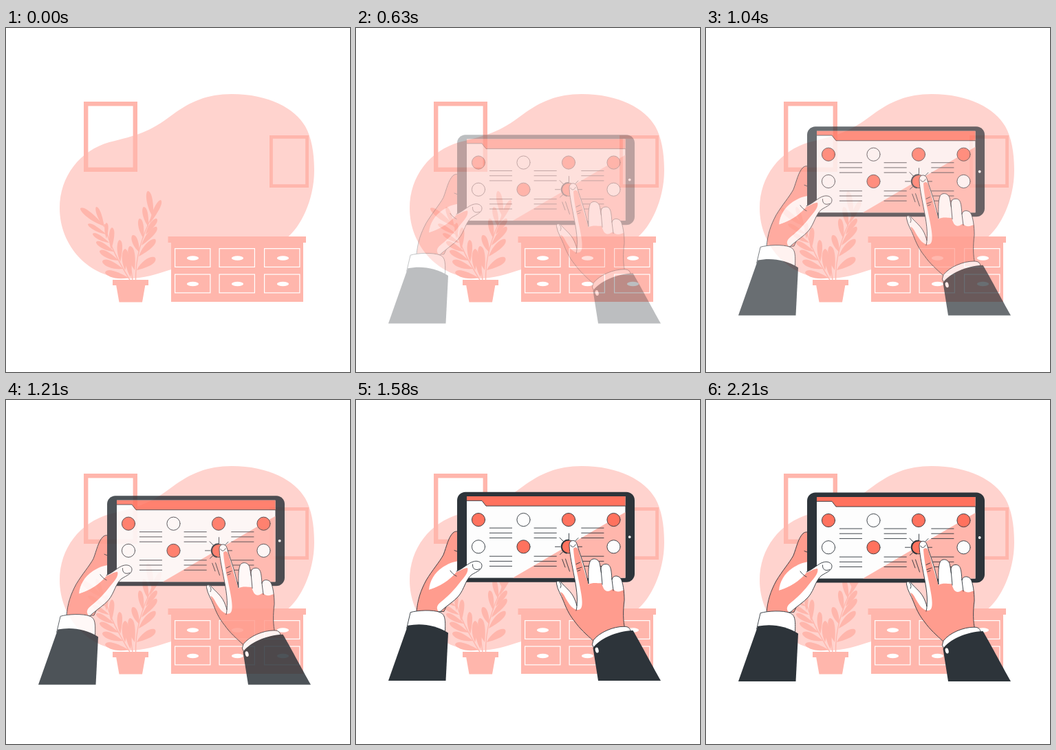
Write an HTML page with a canvas that moves like this. It is 500x500 px and loops after 2.25 s.

```html
<!DOCTYPE html>
<html lang="en">
<head>
<meta charset="utf-8">
<title>Tablet in hands</title>
<style>
html, body { margin: 0; width: 100%; height: 100%; overflow: hidden; background: #fff; }
canvas { display: block; width: 100vw; height: 100vh; }
</style>
</head>
<body>
<canvas id="stage" width="500" height="500"></canvas>
<script>
const SIZE = 500, LOOP = 2250, FPS = 24, FRAMES = 54;
const DARK = '#2d343a', CORAL = '#ff725e', SKIN = '#ff9c8e',
      ROSE = '#ffb6ac', BLUSH = '#ffd3ce', WHITE = '#fff', PAPER = '#fdfdfd';

const view = document.getElementById('stage').getContext('2d');

function layer() {
  const c = document.createElement('canvas');
  c.width = c.height = SIZE;
  return c.getContext('2d');
}

function shape(g, d, fill, stroke, width = 0.9) {
  const p = new Path2D(d);
  if (fill) { g.fillStyle = fill; g.fill(p); }
  if (stroke) { g.strokeStyle = stroke; g.lineWidth = width; g.stroke(p); }
}

function box(g, x1, y1, x2, y2, fill) {
  g.fillStyle = fill;
  g.fillRect(x1, y1, x2 - x1, y2 - y1);
}

function frame(g, x1, y1, x2, y2, width, color) {
  g.strokeStyle = color;
  g.lineWidth = width;
  g.strokeRect(x1 + width / 2, y1 + width / 2, x2 - x1 - width, y2 - y1 - width);
}

function oval(g, x, y, rx, ry, fill, stroke, turn = 0) {
  g.beginPath();
  g.ellipse(x, y, rx, ry, turn, 0, Math.PI * 2);
  g.fillStyle = fill;
  g.fill();
  if (stroke) { g.strokeStyle = stroke; g.lineWidth = 0.9; g.stroke(); }
}

// Leaf from base to tip, widest near the tip.
function leaf(g, bx, by, tx, ty, w) {
  const dx = tx - bx, dy = ty - by, len = Math.hypot(dx, dy);
  const nx = -dy / len * w, ny = dx / len * w;
  const at = (k, s) => [bx + dx * k + nx * s, by + dy * k + ny * s];
  g.beginPath();
  g.moveTo(bx, by);
  g.bezierCurveTo(...at(0.45, 0.55), ...at(0.95, 0.85), tx, ty);
  g.bezierCurveTo(...at(0.95, -0.6), ...at(0.45, -0.85), bx, by);
  g.fillStyle = ROSE;
  g.fill();
}

function drawPlant(g) {
  shape(g, 'M181 368C164 340 150 316 143 285M188.500 368C188 335 196 305 215 268M184 367C182 350 180 335 176 325',
    null, ROSE, 1.3);
  const leaves = [
    [143, 288, 108, 262, 8], [143, 290, 131, 260, 6], [146, 300, 119, 285, 6],
    [150, 312, 126, 299, 6], [157, 325, 131, 311, 7], [164, 338, 136, 324, 8],
    [170, 350, 140, 339, 9], [178, 363, 144, 355, 9],
    [146, 306, 146, 283, 5], [153, 322, 154, 290, 7], [166, 340, 165, 308, 7],
    [173, 352, 173, 321, 8], [181, 362, 177, 330, 8], [187, 352, 180, 317, 9],
    [214, 276, 206, 237, 8], [209, 284, 225, 250, 7], [207, 289, 200, 260, 7],
    [200, 306, 194, 277, 7], [194, 326, 184, 301, 8], [203, 300, 219, 277, 7],
    [197, 316, 219, 289, 8], [193, 332, 217, 307, 9], [190, 352, 217, 334, 10]
  ];
  for (const l of leaves) leaf(g, ...l);
  box(g, 155, 366, 207, 374, ROSE);
  shape(g, 'M160 373H202.500L198 398.500H164.500Z', ROSE);
}

function drawRoom(g) {
  box(g, 0, 0, SIZE, SIZE, WHITE);
  shape(g, 'M78 262C78 215 108 178 150 166C190 156 208 152 242 126C268 107 292 96 328 96' +
    'C382 96 420 117 435 143C444 159 448 181 448 207C448 250 428 290 408 305C340 335 270 342 240 351' +
    'C218 358 200 364 178 364C120 364 78 316 78 262Z', BLUSH);
  frame(g, 113, 107, 191, 209, 6.4, ROSE);
  frame(g, 383, 156, 440, 232, 4.8, ROSE);
  drawPlant(g);
  box(g, 235.5, 303, 436, 312, ROSE);
  box(g, 240, 311, 432, 398, ROSE);
  for (const [x, knob] of [[245, 271.5], [309.5, 336.5], [375, 402.5]]) {
    for (const y of [320, 357.5]) {
      frame(g, x, y, x + 52.5, y + 28, 1.2, WHITE);
      oval(g, knob, y + 14.5, 8.6, 3.3, WHITE);
    }
  }
}

function drawTablet(g) {
  g.beginPath();
  g.roundRect(147, 134.6, 258, 131, 12);
  g.fillStyle = DARK;
  g.fill();
  box(g, 161, 141, 391.5, 259.5, PAPER);
  shape(g, 'M391.500 164V259.500H228Z', ROSE);
  shape(g, 'M161 141H391.500V155H189L183 147.300H161Z', CORAL);
  shape(g, 'M161 147.300H183L189 155H391.500', null, DARK);
  oval(g, 397.7, 200, 1.9, 1.9, WHITE);

  const cols = [178, 243.5, 309, 374.5];
  const filled = [[1, 0, 1, 1], [0, 1, 1, 0]];
  filled.forEach((row, r) => row.forEach((on, c) =>
    oval(g, cols[c], 175 + r * 39.2, 9.6, 9.6, on ? CORAL : PAPER, DARK)));

  let lines = '';
  for (const y of [187, 194.2, 201.4, 228.1, 235.3, 242.5])
    for (const x of [194.3, 259, 327.7]) lines += `M${x} ${y}h32.3`;
  shape(g, lines, null, DARK);

  // Tap burst around the pressed button.
  shape(g, 'M309.500 195V203.500M289.500 214.200H297M296 201L301.500 206.500M296.500 225.500L301 221.500' +
    'M323 201.500L318.500 206M321.500 214.200H328.500M299.800 232.500L304 244M304.500 232L310.500 250', null, DARK);
  shape(g, 'M309 204.600A9.600 9.600 0 0 0 306 223.500', null, DARK, 2);
}

function drawLeftPalm(g) {
  shape(g, 'M88 309C89.500 291 94 278 102 263C111 248 121 237 127 226C132 213 134 201 141 194' +
    'C144 191.500 147 191.500 150 193V262L128 308Z', SKIN, DARK);
  shape(g, 'M106 277C107 264 114 252 126 244C134 239 140 236 150 235V252L130 266C120 272 112 275 106 277Z', WHITE);
  shape(g, 'M143 219.500L148 221.500', null, DARK);
}

function drawLeftArm(g) {
  shape(g, 'M146 250C156 246 163 238 170 236C177 233.500 183 237 183 241.500C183 248 176 250 168 255' +
    'C159 262 158 275 149 286C142 294 133 299 124 308L92 310C100 292 108 278 120 272C134 266 140 256 146 250Z', WHITE);
  shape(g, 'M146 251C152 249 157 245 162 245C164 250 159 257 152 265C143 277 134 286 124 294' +
    'C116 300 117 305 120 308L89 310C94 290 100 280 106 277C121 273 136 263 146 251Z', SKIN);
  shape(g, 'M146 250C156 246 163 238 170 236C177 233.500 183 237 183 241.500C183 248 176 250 168 255' +
    'C159 262 158 275 149 286C142 294 133 299 123 308M169.500 240C169 247 174 249 180 246.500' +
    'M137 249C139 252 142 255 146 257', null, DARK);
  shape(g, 'M79.500 309.500C90 306.500 112 305.500 122 309.500C129 313 130.500 317 129.300 341L74 333Z', WHITE, DARK);
  shape(g, 'M75.300 328.800C95 325 116 328 134 339.500L130.500 409H47Z', DARK);
}

function drawRightArm(g) {
  const hand = 'M345 351C335 342 325 333 318 323C309 312 305 302 301.500 293C298 284 293 277 291.500 268' +
    'C290.500 263 296 263 299 267C303 272 310 277 315 285C318 290 320 296 321 300' +
    'C323 284 318 262 315 246C312 231 310 219 310 211C310 204 319 203 321 210C324 221 330 236 333 248L338 268' +
    'C338 256 337 244 340 236C342 230 353 230 354.500 240L356.500 252C355 244 357 239.500 363 239.500' +
    'C370 239.500 371 246 372 262C373 255.500 381 255.500 384.500 260C388 265 390 280 390 292C388 308 388 321 391 335L350 355Z';
  shape(g, hand, WHITE);
  shape(g, 'M316 217C319 214 322 215 323.500 220L334 257L338 269C345 265 353 268 357 267C359 274 361 279 366 279' +
    'C371 279 372 274 375 277C380 282 386 278 390 277V292C388 308 388 321 391 335L350 355L345 351' +
    'C335 342 325 333 318 323C309 312 305 302 301.500 293L297 280C302 281 304 289 309 296C314 304 321 308 326 305' +
    'C331 301 328 285 325 270C322 253 317 237 316 217Z', SKIN);
  shape(g, hand, null, DARK);
  shape(g, 'M356.500 252L358 269M372 262L374 278M321 300C321 303 320.500 305 320 307' +
    'M320 239.500L325.500 237M321 246.500L328 244M322 249.500L326 248M312 212C313 216 318 215 319 211' +
    'M295 265C298 267 299 271 297 274', null, DARK);
  shape(g, 'M343.500 356L345 350C354 338.500 374 330 390 330.200C397 330.500 398.500 333 399.500 339L347 363Z', WHITE, DARK);
  shape(g, 'M344.500 361.500C353 348.500 378 337 402.500 336C411 350 430 386 443 409H352Z', DARK);
  oval(g, 350.2, 364.5, 2.4, 4, WHITE, null, -0.25);
}

// Ease with overshoot: cubic-bezier(.36, -.01, .5, 1.38)
function ease(x) {
  const curve = (a, b, s) => 3 * a * s * (1 - s) ** 2 + 3 * b * s * s * (1 - s) + s ** 3;
  let lo = 0, hi = 1;
  for (let i = 0; i < 30; i++) {
    const mid = (lo + hi) / 2;
    if (curve(0.36, 0.5, mid) < x) lo = mid; else hi = mid;
  }
  return curve(-0.01, 1.38, lo);
}

const room = layer(), front = layer();
front.lineCap = front.lineJoin = 'round';
drawRoom(room);

function draw(ms) {
  const step = Math.floor(((ms % LOOP) + 5) * FPS / 1000) % FRAMES;
  view.globalAlpha = 1;
  view.drawImage(room.canvas, 0, 0);
  if (step < 3) return;

  const rise = ease((step + 1) / FRAMES);
  front.setTransform(1, 0, 0, 1, 0, 0);
  front.clearRect(0, 0, SIZE, SIZE);
  front.translate(0, 30 * (1 - rise));
  drawLeftPalm(front);
  drawTablet(front);
  drawLeftArm(front);
  drawRightArm(front);
  view.globalAlpha = Math.max(0, Math.min(1, rise));
  view.drawImage(front.canvas, 0, 0);
}

const start = performance.now();
function tick() {
  draw(performance.now() - start);
  requestAnimationFrame(tick);
}
tick();
</script>
</body>
</html>
```
